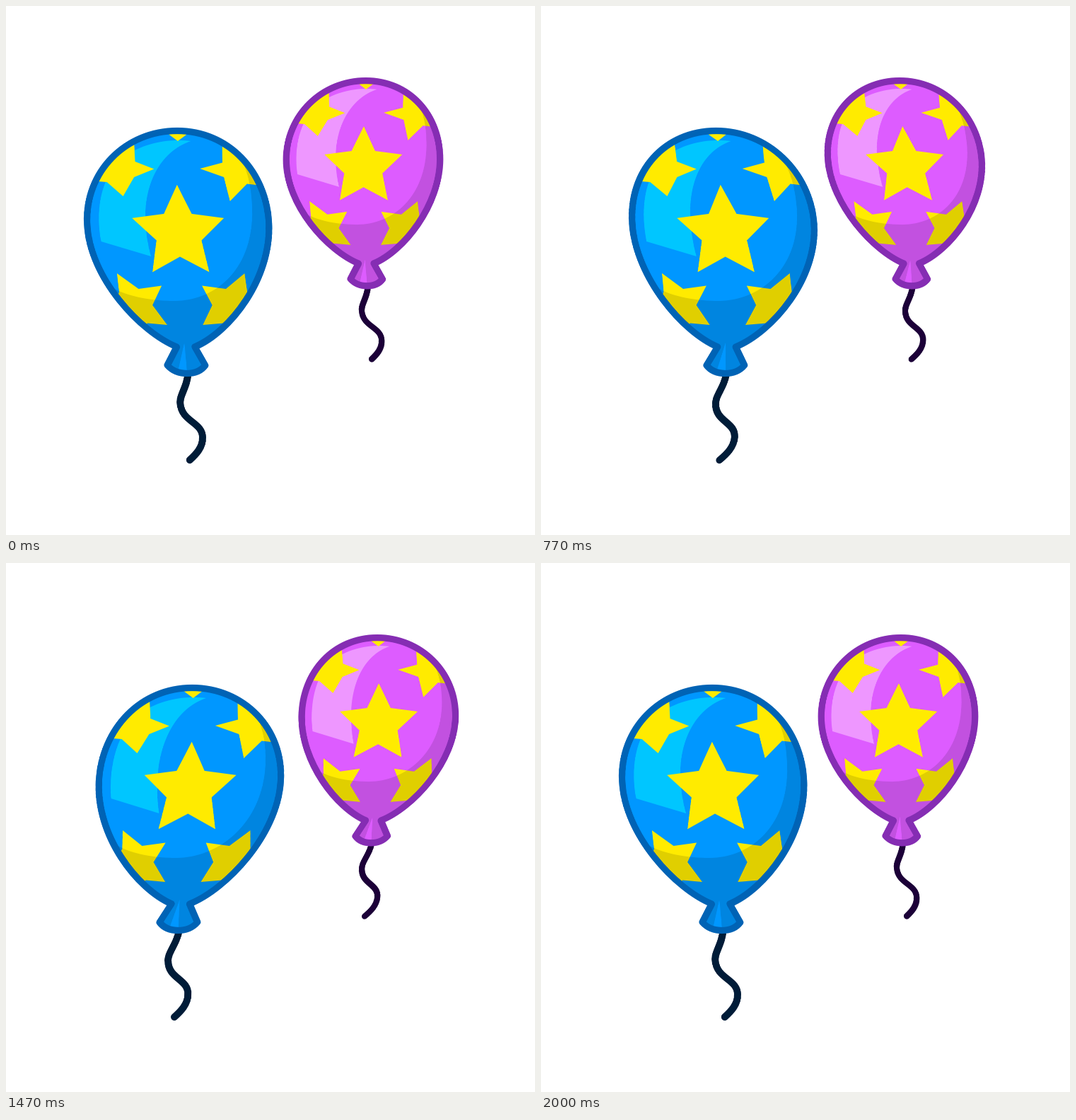
An HTML page with a canvas that plays this animation: 748 px wide and 748 px high, repeating every 2.03 s.

```html
<!DOCTYPE html>
<html lang="en">
<head>
<meta charset="utf-8">
<title>Balloons</title>
<style>
  html, body { margin: 0; width: 100%; height: 100%; overflow: hidden; background: #fff; }
  canvas { display: block; width: 748px; height: 748px; }
</style>
</head>
<body>
<canvas id="stage" width="748" height="748"></canvas>
<script>
const SIZE = 748, SCALE = 2, LOOP = 2030;
const RAD = Math.PI / 180;

const BODY = new Path2D(`M252.3 176.5 C325 176.5 380.8 234 380.8 308
  C380.8 385 315.5 461 264.3 482 L277.2 508 Q268 519.5 250.4 519.5
  Q233 519.5 223.6 508 L238.8 482 C189 461 123.8 385 123.8 308
  C123.8 234 179.6 176.5 252.3 176.5Z`);

// Everything outside the lit area, leaving a light wedge in the knot
const SHADE = new Path2D(`M120 380 L163 403 C185 413 215 417 240 417
  C300 417 358 370 358 285 C358 250 350 215 325 193
  L400 180 V530 H251 L250 476 L234 530 H120Z`);

const GLOSS = new Path2D(`M272 191 C228 206 206 254 206.5 306
  Q206.5 331 211.7 354 L142.5 333 C136 285 147 238 178 213 C205 194 240 187 272 191Z`);

const TAIL = new Path2D(`M252 520 C249 540 238 550 238.5 562
  C239 588 268.5 588 268 610 C268 624 258 634 249 642`);

const STARS = new Path2D(
  'M236 178 H271 L253.6 191Z' +
  'M191 176 L193.5 220 L220.3 230.5 L192 242 L176 269 L153.5 249 L115 246V176Z' +
  'M316 176 L317 221.5 L285.2 230 L319 242 L327 276 L351.5 251.5 L390 256 V176Z' +
  'M162 378 L191 400 L224 395.5 L209 423 L227.7 451 L200 448.5 L180 470 L150 440 L163.3 404Z' +
  'M342.5 378 L314.5 400 L281 395.5 L293.5 423 L278 451 L308 448.5 L330 470 L357 440 L344.5 404Z' +
  starPath(252.6, 321, 68.3, 33.5));

function starPath(cx, cy, outer, inner) {
  let d = '';
  for (let i = 0; i < 10; i++) {
    const r = i % 2 ? inner : outer, a = (i * 36 - 90) * RAD;
    d += (i ? 'L' : 'M') + (cx + r * Math.cos(a)) + ' ' + (cy + r * Math.sin(a));
  }
  return d + 'Z';
}

function balloon(g, x, y, scale, look) {
  g.save();
  g.translate(x, y);
  g.scale(scale, scale);
  g.lineCap = g.lineJoin = 'round';

  g.strokeStyle = look.tail;
  g.lineWidth = 10;
  g.stroke(TAIL);

  g.save();
  g.clip(BODY);
  g.fillStyle = look.skin;
  g.fillRect(100, 150, 300, 400);
  g.fillStyle = look.gloss;
  g.fill(GLOSS);
  g.fillStyle = '#ffeb00';
  g.fill(STARS);
  g.fillStyle = 'rgba(0,0,0,.12)';
  g.fill(SHADE);
  g.restore();

  g.strokeStyle = look.edge;
  g.lineWidth = 9.3 / scale;
  g.stroke(BODY);
  g.restore();
}

const art = document.createElement('canvas');
art.width = art.height = SIZE * SCALE;
const pen = art.getContext('2d');
pen.scale(SCALE, SCALE);
balloon(pen, 0, 0, 1, { skin: '#0097ff', edge: '#0063b5', gloss: '#00c6ff', tail: '#001c38' });
balloon(pen, 302.5, -43.7, .846, { skin: '#dd5cff', edge: '#852db3', gloss: '#ee97ff', tail: '#1c0038' });

const ctx = document.getElementById('stage').getContext('2d');
let shown = -1;

// A sine wave running down the picture shifts each row sideways
function paint(step) {
  ctx.clearRect(0, 0, SIZE, SIZE);
  for (let y = 90; y < 660; y++) {
    const dx = 11 * Math.sin((step * 12 - .4 * (y + .5) - 1) * RAD);
    ctx.drawImage(art, 0, y * SCALE, SIZE * SCALE, SCALE, dx, y, SIZE, 1);
  }
}

// 30 steps a second, with step times rounded to 10 ms
function tick() {
  const t = Math.floor(performance.now() % LOOP / 10) * 10;
  const step = Math.floor((t + 4) * .03);
  if (step !== shown) paint(shown = step);
  requestAnimationFrame(tick);
}
tick();
</script>
</body>
</html>
```
